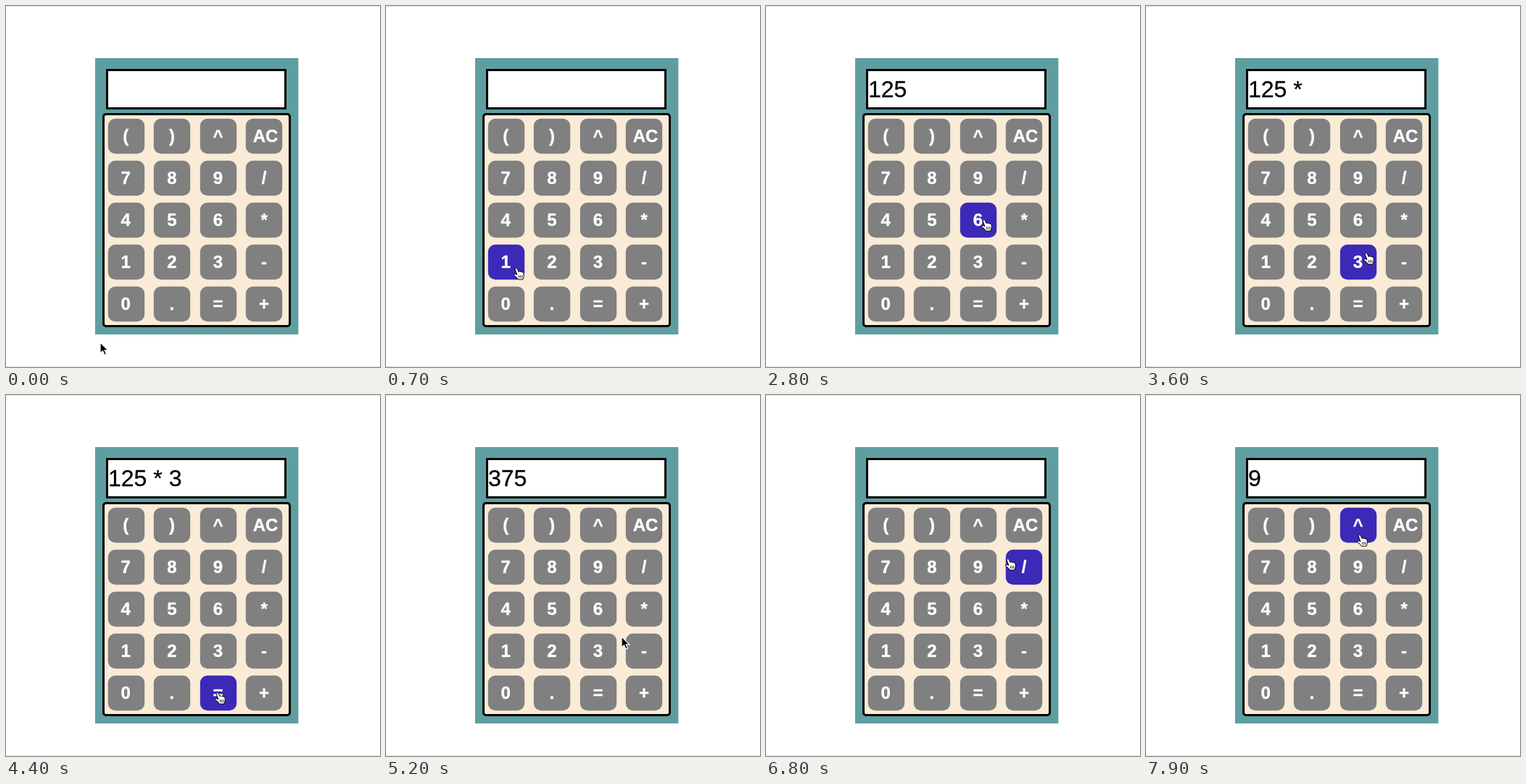
Animation of 516x499 px, one loop 8000 ms. Source, as an HTML page:

```html
<!DOCTYPE html>
<html lang="en">
<head>
<meta charset="utf-8">
<title>Calculator</title>
<style>
  html, body { margin: 0; width: 100%; height: 100%; overflow: hidden; background: #fff; }
  svg { display: block; width: 516px; height: 499px; font-family: "Liberation Sans", Arial, sans-serif; }
  .key rect { fill: #808080; }
  .key.hover rect { fill: #3c29b8; }
  .key text { fill: #fff; stroke: #fff; stroke-width: .4; font-size: 24px; font-weight: bold; text-anchor: middle; }
  #display { font-size: 32px; stroke: #000; stroke-width: .3; white-space: pre; }
</style>
</head>
<body>
<svg viewBox="0 0 516 499">
  <path d="M0 .5H516M0 498.5H516" stroke="#e3e3e3"/>
  <rect x="123" y="72" width="280.4" height="382" fill="#5f9ea0"/>
  <rect x="139.5" y="88.5" width="246" height="53" fill="#fff" stroke="#000" stroke-width="3"/>
  <rect x="134.5" y="149.5" width="257" height="293" rx="3.5" fill="#faebd7" stroke="#000" stroke-width="3"/>
  <text id="display" x="141" y="125.5"></text>
  <g id="keys"></g>
  <g id="arrow">
    <path transform="translate(-1 -1)" d="M0 0V15L3.5 11.8L6 17.4L8.5 16.3L6.1 10.9H10.8Z" stroke="#fff" stroke-width="1.2"/>
  </g>
  <g id="hand">
    <g transform="translate(-5.5 -1.5)" stroke="#000" stroke-linejoin="round" stroke-linecap="round">
      <path d="M2.6 1.8Q4.4 -.1 5.8 1.8L7.4 5.8Q9 4.6 10 6Q11.6 4.8 12.5 6.5Q14.4 6.1 14.7 8.4V12L13.4 16.5H7Q5.4 13.6 1.4 11Q.3 9 2.4 8.8L5 9.8Z" fill="#fff"/>
      <path d="M8 11V14M10.1 11V14M12.2 11V14" fill="none" stroke-width=".8"/>
    </g>
  </g>
</svg>
<script>
const LOOP = 8000, STEP = 100, SETTLE = 200, REST = 100;
const KEY_W = 50, KEY_H = 48;
const $ = id => document.getElementById(id);

const keys = ["(", ")", "^", "AC", ..."789/456*123-0.=+"].map((label, i) => {
  const col = i % 4, x = Math.round(141 + col * 63.4), y = 156 + Math.floor(i / 4) * 58;
  const textX = 165.3 + col * 63.6 + (label.length - 1) * 2;
  $("keys").insertAdjacentHTML("beforeend",
    `<g class="key"><rect x="${x - .2}" y="${y - .2}" width="${KEY_W + .4}" height="${KEY_H + .4}" rx="10"/>
     <text x="${textX}" y="${y + 32}">${label}</text></g>`);
  return { label, x, y, node: $("keys").lastElementChild };
});

// The pointer settles on a key shortly before pressing it and rests briefly after.
function stop(label, at, pressed, dx = KEY_W / 2, dy = KEY_H / 2) {
  const key = keys.find(k => k.label === label);
  return {
    label, at, pressed, x: key.x + dx, y: key.y + dy,
    arrive: pressed ? at - SETTLE : at,
    leave: pressed ? at + REST : at
  };
}
const press = (label, at, dx, dy) => stop(label, at, true, dx, dy);
const pass = (label, at, dx, dy) => stop(label, at, false, dx, dy);

const tour = [
  { x: 131, y: 466, leave: 0 },
  press("1", 1100, 41, 32), press("2", 1900, 22, 5), press("5", 2600),
  press("*", 3300), press("3", 4000, 30, 18), press("=", 4600),
  pass("-", 5200, -5, 5), press("AC", 6600), pass("/", 6800, 4, 13),
  press("9", 7300), pass("^", 7800, 28, 38)
];

const easeOut = k => 1 - (1 - k) ** 3;

function pointerAt(t) {
  const i = tour.findLastIndex(s => s.leave <= t);
  const from = tour[i], to = tour[i + 1] || from;
  const k = to === from ? 1 : easeOut(Math.min(1, (t - from.leave) / (to.arrive - from.leave)));
  return [Math.round(from.x + (to.x - from.x) * k), Math.round(from.y + (to.y - from.y) * k)];
}

function enter(text, label) {
  if (label === "AC") return "";
  if (label === "=") return String(text.split("*").reduce((a, b) => a * b));
  return text + (label === "*" ? " * " : label);
}

function draw(t) {
  const [x, y] = pointerAt(t);
  let over = false;
  for (const key of keys) {
    const hit = x >= key.x && x < key.x + KEY_W && y >= key.y && y < key.y + KEY_H;
    key.node.classList.toggle("hover", hit);
    over = over || hit;
  }
  for (const [id, shown] of [["hand", over], ["arrow", !over]]) {
    $(id).setAttribute("transform", `translate(${x} ${y})`);
    $(id).style.display = shown ? "" : "none";
  }
  $("display").textContent = tour.filter(s => s.pressed && s.at <= t)
    .reduce((text, s) => enter(text, s.label), "");
}

const start = performance.now();
function tick() {
  const t = Math.max(0, performance.now() - start) % LOOP;
  draw(Math.floor(t / STEP) * STEP);
  requestAnimationFrame(tick);
}
tick();
</script>
</body>
</html>
```
